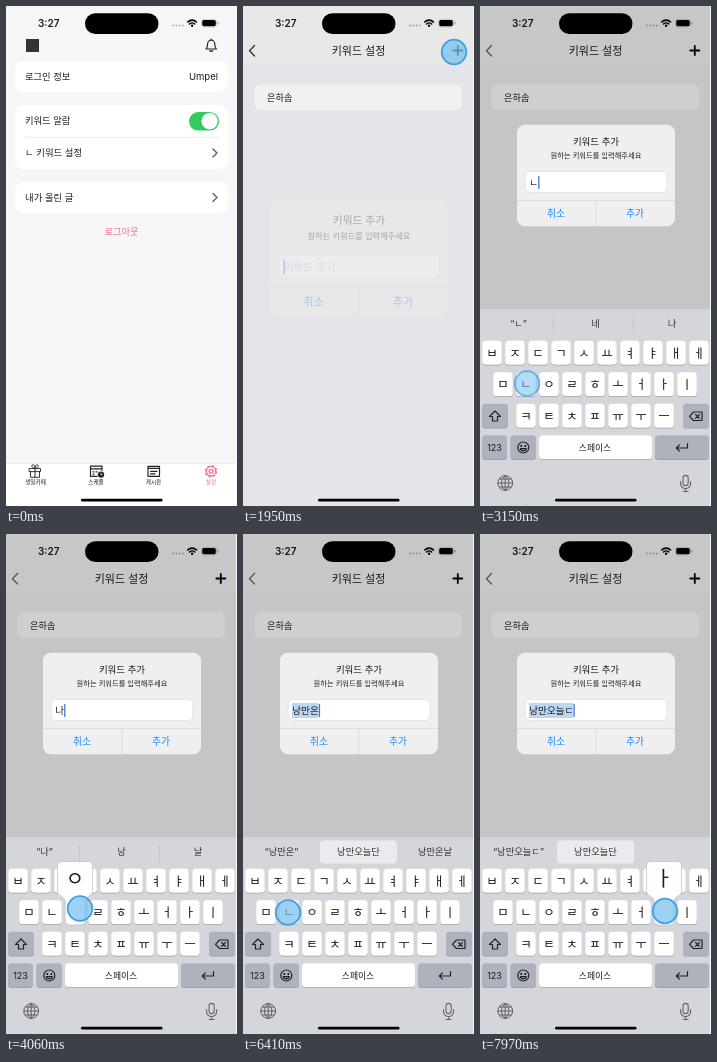
Recreate the animation shown at these times as an HTML page. Size 231 px wide and 500 px high, loop 8000 ms.

```html
<!DOCTYPE html>
<html lang="ko">
<head>
<meta charset="utf-8">
<style>
html, body { margin: 0; width: 100%; height: 100%; overflow: hidden; background: #f6f6f6; }
svg { display: block; width: 100%; height: 100%; font-family: Inter, "Noto Sans CJK KR", "Noto Sans CJK", sans-serif; }
text { fill: #1c1c1c; }
.line { fill: none; stroke: #222; stroke-width: 1.2; stroke-linecap: round; stroke-linejoin: round; }
.pink { fill: #f0708f; }
.blue { fill: #1a86f5; }
.pale { fill: #c4c4c8; }
.word { fill: #333; }
</style>
</head>
<body>
<svg id="stage" viewBox="0 0 231 500"></svg>
<script>
const LOOP = 8000, COMMIT = 130;
const stage = document.getElementById('stage');
const $ = id => document.getElementById(id);

// Markup helpers; text is centred vertically on y
const text = (x, y, s, size, attrs = '') =>
  `<text x="${x}" y="${y + size * .37}" font-size="${size}" ${attrs}>${s}</text>`;
const mid = (x, y, s, size, attrs = '') => text(x, y, s, size, 'text-anchor="middle" ' + attrs);
const box = (x, y, w, h, r, fill, attrs = '') =>
  `<rect x="${x}" y="${y}" width="${w}" height="${h}" rx="${r}" fill="${fill}" ${attrs}/>`;
const line = (d, attrs = '') => `<path class="line" d="${d}" ${attrs}/>`;
const chevron = y => line(`M207 ${y - 4}l4 4l-4 4`, 'style="stroke:#666;stroke-width:1.5"');

// Keyboard layout
const rows = [['ㅂㅈㄷㄱㅅㅛㅕㅑㅐㅔ', 12, 347], ['ㅁㄴㅇㄹㅎㅗㅓㅏㅣ', 23, 378.5], ['ㅋㅌㅊㅍㅠㅜㅡ', 46, 410]];
const keys = {};
rows.forEach(([chars, x, y]) => [...chars].forEach((c, i) => keys[c] = { x: x + 23 * i, y }));

// time, key, typed text, suggestions, touch offset
const presses = [
  [2950, 'ㄴ', 'ㄴ', '네', '나', 1, -1],
  [3480, 'ㅏ', '나', '낭', '날', 1, 0],
  [4000, 'ㅇ', '낭', '낭만', '낭비', 5, -4],
  [4370, 'ㅁ', '낭ㅁ', '낭만', '낭망', 1, 0],
  [4870, 'ㅏ', '낭마', '낭만', '낭망', 0, -1],
  [5120, 'ㄴ', '낭만', '낭만이', '낭만적', 3, -2],
  [5480, 'ㅇ', '낭만ㅇ', '낭만이', '낭만은', 1, 0],
  [5900, 'ㅗ', '낭만오', '낭만오늘단', '낭만오늘', 1, 0],
  [6270, 'ㄴ', '낭만온', '낭만오늘단', '낭만온날', -1, 0],
  [6680, 'ㅡ', '낭만오느', '낭만오늘단', '낭만오늘', 0, 0],
  [7080, 'ㄹ', '낭만오늘', '낭만오늘단', '', 1, 0],
  [7450, 'ㄷ', '낭만오늘ㄷ', '낭만오늘단', '', 1, 0],
  [7900, 'ㅏ', '낭만오늘다', '낭만오늘단', '', 1, -1.5],
].map(([at, key, typed, middle, right, dx, dy]) => ({ at, key, typed, middle, right, dx, dy }));

const touches = [
  { at: 1170, x: 180, y: 147, hold: 160 },
  { at: 1790, x: 211, y: 46, hold: 230 },
  ...presses.map(p => ({ at: p.at, x: keys[p.key].x + p.dx, y: keys[p.key].y + p.dy, hold: 165 })),
];

const settingsPage = `
  <g id="settings">
    ${box(0, 0, 231, 500, 0, '#f6f6f6')}
    ${box(20, 33, 13, 13, 0, '#333')}
    ${line('M200 43h10.4c-1.5-1.3-1.6-2.6-1.6-5a3.6 3.8 0 0 0-7.2 0c0 2.4-.1 3.7-1.6 5zM203.8 44.6a1.6 1.4 0 0 0 2.8 0M205.2 33v1')}
    ${box(9, 55, 213, 31, 8, '#fff')}
    ${text(19, 70.5, '로그인 정보', 9.3)}
    ${text(212, 70.5, 'Umpel', 9.5, 'text-anchor="end"')}
    ${box(9, 99, 213, 64, 8, '#fff')}
    ${text(19, 115, '키워드 알람', 9.3)}
    ${box(183, 106, 30, 18.6, 9.3, '#35cb5c')}
    <circle cx="203.6" cy="115.3" r="8.2" fill="#fff"/>
    ${box(19, 130.7, 194, .8, 0, '#e6e6e8')}
    ${text(19, 147, 'ㄴ 키워드 설정', 9.4)}${chevron(147)}
    ${box(9, 176, 213, 31, 8, '#fff')}
    ${text(19, 191.5, '내가 올린 글', 9.4)}${chevron(191.5)}
    ${mid(115.5, 226, '로그아웃', 9.3, 'class="pink" font-weight="500"')}
    ${box(0, 457.5, 231, 43, 0, '#fff')}${box(0, 457, 231, .6, 0, '#e2e2e2')}
    <g transform="translate(0 -.7)">
      ${line('M23.5 463.3h11v3h-11zM24.5 466.3v5.7h9v-5.7M29 463v9M29 463c-4 0-4-3.4-2-3.4c1.5 0 2 2 2 3.4c0-1.4 .5-3.4 2-3.4c2 0 2 3.4-2 3.4', 'style="stroke-width:.9"')}
      ${line('M96 465v-4.2h-11.5v10.2h6.5M84.5 463.5h11.5M87 466.5h1M90 466.5h1M87 468.8h1')}
      <circle cx="95" cy="469.3" r="3.2" fill="#222"/>
      ${line('M95 467.7v1.7h1.2', 'style="stroke:#fff;stroke-width:.7"')}
      ${line('M142 461h11.5v10h-11.5zM142 463h11.5M144.5 466h6.5M144.5 468.5h4.5')}
      <g fill="none" stroke="#f0708f" stroke-width="1.3">
        <circle cx="205" cy="466" r="4.6"/>
        <circle cx="205" cy="466" r="5.6" stroke-dasharray="2.2"/>
        <circle cx="205" cy="466" r="1.9"/>
      </g>
      ${mid(29.5, 476.5, '생일카페', 5.6)}${mid(90, 476.5, '스케줄', 5.6)}
      ${mid(147.5, 476.5, '게시판', 5.6)}${mid(205, 476.5, '설정', 5.6, 'class="pink"')}
    </g>
    <rect id="shade" width="231" height="500"/>
  </g>`;

const keywordPage = `
  <g id="keywords">
    ${box(0, 0, 231, 500, 0, '#f2f2f6')}${box(0, 0, 231, 58, 0, '#f5f5f5')}
    ${line('M11.5 39.5l-5 5.2l5 5.2', 'id="back" style="stroke-width:1.4"')}
    ${mid(115.5, 44.5, '키워드 설정', 11, 'font-weight="500"')}
    ${line('M210.3 44.5h9M214.8 40v9', 'style="stroke:#000;stroke-width:1.8"')}
    ${box(11.5, 78.5, 207.5, 25.5, 6, '#fff')}
    ${text(24, 91.3, '은하솜', 9.2)}
  </g>`;

const statusBar = `
  ${text(32, 17.3, '3:27', 10, 'font-weight="600"')}
  ${box(79, 7.3, 73.5, 20.8, 10.4, '#000')}
  ${[167, 170.3, 173.6, 176.9].map(x => `<circle cx="${x}" cy="19.5" r=".9" fill="#aaa"/>`).join('')}
  ${line('M181.7 16a6.2 6.2 0 0 1 8.8 0M183.5 18a3.7 3.7 0 0 1 5.2 0', 'style="stroke:#000;stroke-width:1.6"')}
  <circle cx="186.1" cy="19.7" r="1.2"/>
  ${box(195.5, 13.3, 15, 7.7, 2.3, 'none', 'stroke="#bbb" stroke-width=".6"')}
  ${box(196.2, 14, 13.6, 6.3, 1.7, '#000')}${box(211.4, 15.8, 1, 2.7, .5, '#999')}`;

const alertBox = `
  <g id="alert"><g transform="translate(-116 -169.5)">
    ${box(37, 118.7, 158, 101.6, 8, '#efeff1')}
    ${mid(116, 135.5, '키워드 추가', 9.5, 'font-weight="500"')}
    ${mid(116, 149, '원하는 키워드를 입력해주세요', 7.25)}
    ${box(45.3, 165.5, 141.5, 21, 5, '#fff', 'stroke="#dcdce0" stroke-width=".6"')}
    <rect id="mark" x="49" y="169" height="15" fill="#bcd6f1"/>
    ${text(50, 176.5, '키워드 추가', 9.3, 'id="hint" class="pale"')}
    ${text(49.3, 176.3, '', 9.6, 'id="typed"')}
    <rect id="caret" y="170" width="1.3" height="13" rx=".6" fill="#3f74e0"/>
    ${box(37, 194, 158, .6, 0, '#d0d0d3')}${box(115.7, 194, .6, 26.3, 0, '#d0d0d3')}
    ${mid(76, 207, '취소', 9.7, 'class="blue" font-weight="500"')}
    ${mid(155, 207, '추가', 9.7, 'class="blue"')}
  </g></g>`;

const keyCap = (x, y, w, fill = '#fff') =>
  box(x, y - 11.4, w, 24, 3.5, '#9a9da5') + box(x, y - 12.2, w, 24, 3.5, fill);
const GRAY = '#adb2be';
const keyboard = `
  <g id="keyboard">
    ${box(0, 303, 231, 198, 0, '#d4d6dc')}
    <g id="dividers">${box(73, 311, .7, 17, 0, '#bcbfc6')}${box(153, 311, .7, 17, 0, '#bcbfc6')}</g>
    ${box(77, 306.5, 77, 23, 4, '#eaebee', 'id="pick"')}
    <g id="words">${mid(0, 317.7, '', 9.3, 'class="word"').repeat(3)}</g>
    ${Object.entries(keys).map(([c, k]) => keyCap(k.x - 9.8, k.y, 19.6) + mid(k.x, k.y, c, 12.5)).join('')}
    ${keyCap(2, 410, 26, GRAY)}${keyCap(203, 410, 26, GRAY)}
    ${keyCap(2, 441.5, 25, GRAY)}${keyCap(30.5, 441.5, 25.5, GRAY)}
    ${keyCap(59, 441.5, 113)}${keyCap(175, 441.5, 54, GRAY)}
    ${line('M15 405l-5.5 5.5h3v4.5h5v-4.5h3z')}
    ${line('M213.5 406h8.5v8.5h-8.5l-4-4.2zM215.5 408.3l4 4M219.5 408.3l-4 4')}
    ${mid(14.5, 441.5, '123', 9)}
    <circle class="line" cx="43.3" cy="441.5" r="5.5"/>
    <circle cx="41.3" cy="440" r=".9"/><circle cx="45.3" cy="440" r=".9"/>
    ${line('M40.3 442.7a3.1 3 0 0 0 6 0z')}
    ${mid(115, 441.3, '스페이스', 8.8)}
    ${line('M207.5 437.5v4.5h-11M199.5 438.8l-3.2 3.2l3.2 3.2')}
    ${line('M17.8 477a7.4 7.4 0 0 1 14.8 0a7.4 7.4 0 0 1-14.8 0h14.8M25.2 469.6v14.8M25.2 469.6c-5 4-5 10.8 0 14.8c5-4 5-10.8 0-14.8M19.5 473h11.4M19.5 481h11.4', 'style="stroke:#555;stroke-width:.9"')}
    ${line('M203 472a2.6 2.6 0 0 1 5.2 0v5a2.6 2.6 0 0 1-5.2 0zM200.6 475.5v2a5 5 0 0 0 10 0v-2M205.6 482.5v3M203 485.5h5.2', 'style="stroke:#666;stroke-width:1.1"')}
    <g id="popup">
      <path d="M-13.5-51h27q4 0 4 4v26c0 5-7.7 4-7.7 11v19q0 3.5-3.5 3.5h-12.6q-3.5 0-3.5-3.5v-19c0-7-7.7-6-7.7-11v-26q0-4 4-4z" fill="#fdfdfe" stroke="#b4b7be" stroke-width=".6"/>
      ${mid(0, -34, '', 20)}
    </g>
  </g>`;

// The app ends one pixel before the right edge of the stage
stage.innerHTML = settingsPage + keywordPage + statusBar +
  '<rect id="dim" width="231" height="500"/>' + alertBox + keyboard +
  box(75, 492.8, 81.5, 2.8, 1.4, '#000') + box(230, 0, 1, 500, 0, '#f6f6f6') +
  touches.map(p => `<circle class="touch" cx="${p.x}" cy="${p.y}" r="12.3" fill="#7cc2f0" fill-opacity=".75" stroke="#3f9fe0" stroke-width="1.8"/>`).join('');

const dots = [...document.querySelectorAll('.touch')];
const words = [...$('words').children];
const popupText = $('popup').querySelector('text');
const clamp = v => Math.min(1, Math.max(0, v));
const easeOut = (t, start, length, power) => 1 - (1 - clamp((t - start) / length)) ** power;
const set = (id, attrs) => Object.entries(attrs).forEach(([k, v]) => $(id).setAttribute(k, v));
const show = (id, on) => $(id).style.display = on ? '' : 'none';

function draw(t) {
  const push = easeOut(t, 1300, 400, 3);
  const open = easeOut(t, 1885, 400, 2);
  const rise = easeOut(t, 2060, 310, 3);
  set('settings', { transform: `translate(${-70 * push})` });
  set('shade', { opacity: .1 * push });
  set('keywords', { transform: `translate(${231 * (1 - push)})` });
  set('back', { opacity: 1 - .35 * open });
  set('dim', { opacity: .187 * open });
  set('alert', { opacity: open, transform: `translate(116 ${253 - 83.5 * rise}) scale(${1.19 - .19 * open})` });
  set('keyboard', { transform: `translate(0 ${200 * (1 - rise)})` });
  show('keyboard', rise > 0);

  const count = presses.filter(p => t >= p.at + COMMIT).length;
  const { typed = '', middle = '내', right = '나' } = presses[count - 1] || {};
  const picked = count >= 8;
  $('typed').textContent = typed;
  const width = typed ? $('typed').getComputedTextLength() : 0;
  set('caret', { x: 49.3 + width });
  set('mark', { width });
  show('mark', picked);
  show('pick', picked);
  show('dividers', !picked);
  show('hint', !count);
  const wordX = count ? [38.5, 115.5, 192] : [34, 111, 192];
  [count ? `“${typed}”` : '오', middle, right].forEach((w, i) => {
    words[i].textContent = w;
    words[i].setAttribute('x', wordX[i]);
  });
  set('words', { opacity: count ? 1 : .3 + .7 * clamp((t - 2290) / 380) });

  const down = presses.find(p => t >= p.at && t < p.at + COMMIT);
  show('popup', down);
  if (down) {
    const { x, y } = keys[down.key];
    set('popup', { transform: `translate(${x} ${y})` });
    popupText.textContent = down.key;
  }
  touches.forEach(({ at, hold }, i) =>
    dots[i].setAttribute('opacity', Math.min(clamp((t - at) / 40), 1 - clamp((t - at - hold) / 150))));
}

function tick() {
  draw(performance.now() % LOOP);
  requestAnimationFrame(tick);
}
tick();
</script>
</body>
</html>
```
